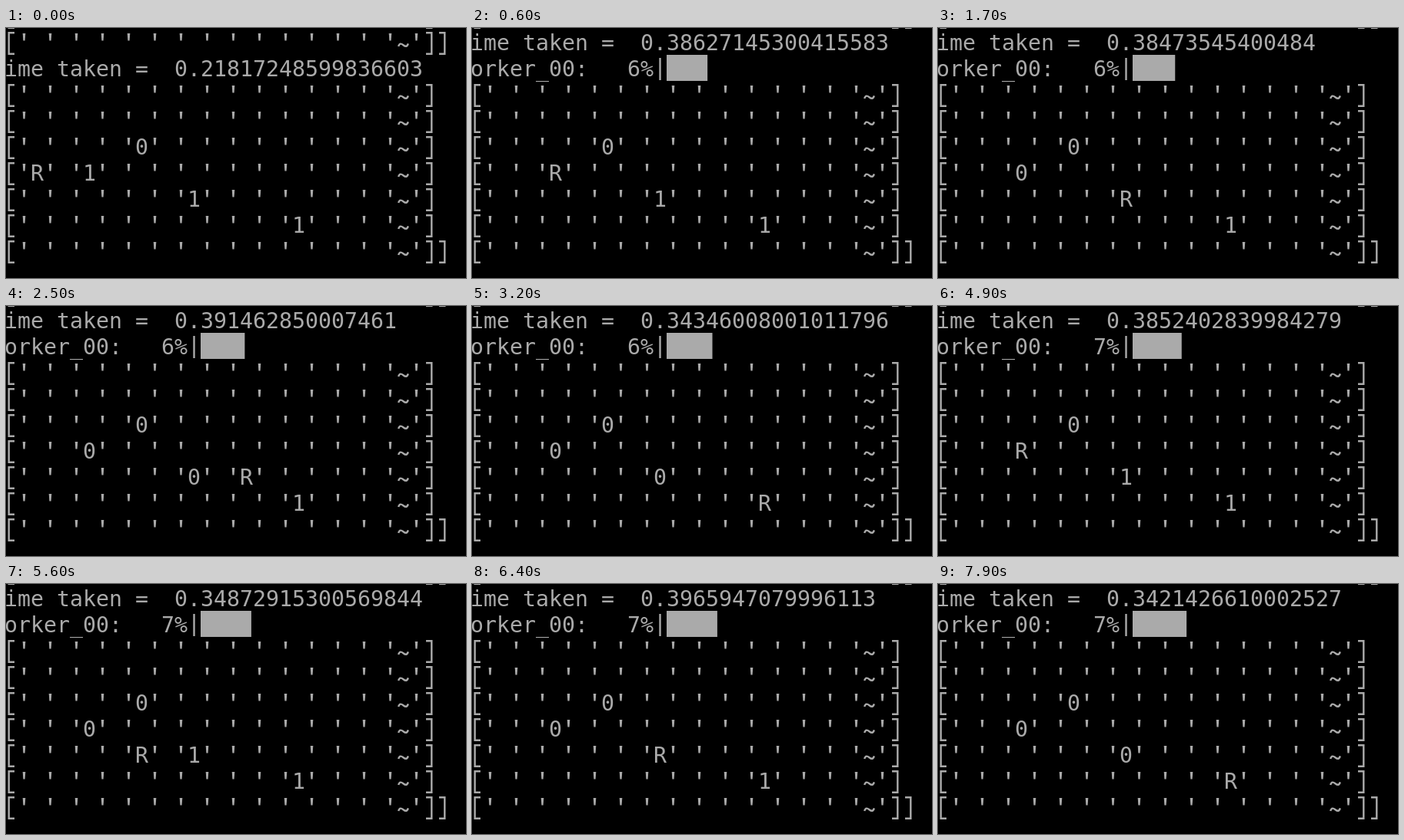
An HTML page with a canvas that plays this animation: 598x326 px, repeating every 8 s.

```html
<!DOCTYPE html>
<html lang="en">
<head>
<meta charset="utf-8">
<title>Terminal grid run</title>
<style>
  html, body { margin: 0; width: 100%; height: 100%; overflow: hidden; background: #000; }
  canvas { display: block; }
</style>
</head>
<body>
<canvas id="term" width="598" height="326"></canvas>
<script>
const ctx = document.getElementById('term').getContext('2d');
const LOOP = 8000, CW = 17, LH = 34, LEFT = -2, BASE = 29, INK = '#aaaaaa';

// start ms, seconds shown, percent, bar length in eighths of a cell, agent row, agent column
// A percent of 0 means the bar is not printed yet.
const steps = [
  [0,    '0.21817248599836603', 0, 0,  3, 0],
  [200,  '0.3921748210093472',  5, 24, 3, 1],
  [600,  '0.38627145300415583', 6, 25, 3, 1],
  [1000, '0.39150826799624163', 6, 25, 4, 1],
  [1300, '0.34728619500762793', 6, 25, 4, 2],
  [1700, '0.38473545400484',    6, 26, 4, 3],
  [2100, '0.3861790279969573',  6, 26, 4, 3],
  [2500, '0.391462850007461',   6, 27, 4, 4],
  [2900, '0.387250916002319',   6, 27, 4, 5],
  [3200, '0.34346008001011796', 6, 28, 5, 5],
  [3900, '0.38914627500460483', 6, 28, 5, 6],
  [4100, '0.22319421100837644', 0, 0,  3, 0],
  [4500, '0.3947162580025196',  6, 29, 3, 1],
  [4900, '0.3852402839984279',  7, 30, 3, 1],
  [5300, '0.3918264770046287',  7, 30, 4, 1],
  [5600, '0.34872915300569844', 7, 31, 4, 2],
  [6400, '0.3965947079996113',  7, 31, 4, 3],
  [6800, '0.3874261590040826',  7, 32, 4, 4],
  [7200, '0.3819472630012495',  7, 32, 4, 5],
  [7900, '0.3421426610002527',  7, 33, 5, 5]
];

// Pickups: row, column; each turns from 1 to 0 once the agent has passed.
const pickups = [[3, 1], [4, 3], [5, 5]];

const leftOf = col => LEFT + CW * col;
const mid = col => leftOf(col + 0.5);
const baseOf = line => BASE + LH * line;

function text(str, col, y) {
  ctx.fillText(str, leftOf(col), y);
}

function bracket(col, y, dir) {
  const x = mid(col);
  ctx.beginPath();
  ctx.moveTo(x + 4.5 * dir, y - 22.8);
  ctx.lineTo(x - 2.8 * dir, y - 22.8);
  ctx.lineTo(x - 2.8 * dir, y + 4.8);
  ctx.lineTo(x + 4.5 * dir, y + 4.8);
  ctx.stroke();
}

function quote(col, y) {
  const x = mid(col);
  ctx.beginPath();
  ctx.moveTo(x - 1.8, y - 22);
  ctx.lineTo(x + 1.8, y - 22);
  ctx.lineTo(x + 1.1, y - 12.5);
  ctx.lineTo(x - 1.1, y - 12.5);
  ctx.fill();
}

function tilde(col, y) {
  const x = mid(col);
  ctx.beginPath();
  ctx.moveTo(x - 6.3, y - 5);
  ctx.bezierCurveTo(x - 5, y - 9.7, x - 2.5, y - 8.8, x, y - 6.8);
  ctx.bezierCurveTo(x + 2.5, y - 4.8, x + 5, y - 3.9, x + 6.3, y - 8.6);
  ctx.stroke();
}

function gridRow(line, cells, last) {
  const y = baseOf(line);
  bracket(0, y, 1);
  for (let i = 1; i < 32; i += 2) quote(i, y);
  for (const c in cells) text(cells[c], 2 + 4 * c, y);
  tilde(30, y);
  bracket(32, y, -1);
  if (last) bracket(33, y, -1);
}

function boardCells(row, agentRow, agentCol) {
  const cells = {};
  if (row === 2) cells[2] = '0';
  for (const [r, c] of pickups) {
    const passed = r < agentRow || (r === agentRow && c < agentCol);
    if (r === row) cells[c] = passed ? '0' : '1';
  }
  if (row === agentRow) cells[agentCol] = 'R';
  return cells;
}

function draw(t) {
  const [, secs, pct, eighths, row, col] = steps.filter(s => s[0] <= t).pop();
  ctx.fillStyle = '#000';
  ctx.fillRect(0, 0, 598, 326);
  ctx.fillStyle = ctx.strokeStyle = INK;
  ctx.lineWidth = 2.4;
  ctx.font = '28.24px "DejaVu Sans Mono", monospace';

  gridRow(-1, {}, pct > 0);
  if (!pct) gridRow(0, {}, true);
  text('ime taken =  ' + secs, 0, baseOf(pct ? 0 : 1));
  if (pct) {
    text('orker_00:   ' + pct + '%', 0, baseOf(1));
    ctx.fillRect(mid(14) - 1.2, 39, 2.4, 29);
    ctx.fillRect(leftOf(15), 35, CW * eighths / 8, LH);
  }
  for (let r = 0; r < 7; r++) gridRow(r + 2, boardCells(r, row, col), r === 6);
}

function tick() {
  draw(performance.now() % LOOP);
  requestAnimationFrame(tick);
}
tick();
</script>
</body>
</html>
```
